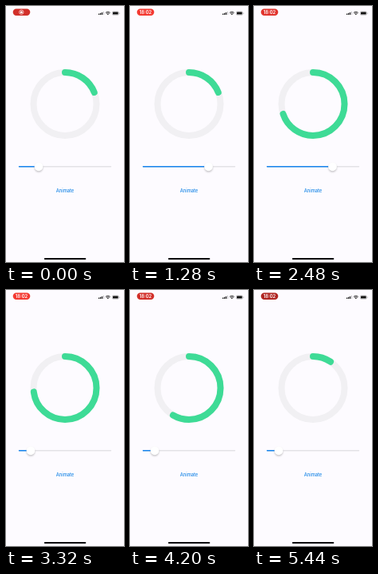
Animation, 148 px wide and 320 px high, one loop 5480 ms. Source, as an HTML page:

```html
<!DOCTYPE html>
<html lang="en">
<head>
<meta charset="utf-8">
<title>Progress ring</title>
<style>
  html, body { margin: 0; width: 100%; height: 100%; overflow: hidden; background: #fdfbff; }
  svg { display: block; width: 148px; height: 320px; }
  text { font-family: Inter, "Liberation Sans", sans-serif; text-anchor: middle; }
</style>
</head>
<body>
<svg viewBox="0 0 148 320">
  <defs>
    <filter id="soft" x="-60%" y="-60%" width="220%" height="220%">
      <feGaussianBlur stdDeviation="1.3"/>
    </filter>
  </defs>

  <!-- status bar -->
  <rect id="pill" x="8.7" y="3.5" width="21.6" height="8.4" rx="4.2"/>
  <g id="icon" fill="none" stroke="#fff" stroke-width=".7">
    <circle cx="19.3" cy="7.7" r="2.7"/>
    <circle cx="19.3" cy="7.7" r="1.5" fill="#fff" stroke="none"/>
  </g>
  <text id="clock" x="19.5" y="9.8" font-size="5.8" font-weight="600" fill="#fff">18:02</text>
  <g fill="#111">
    <rect x="116" y="9.5" width="1.2" height="1.6" rx=".3"/>
    <rect x="117.9" y="8.8" width="1.2" height="2.3" rx=".3"/>
    <rect x="119.8" y="7.9" width="1.2" height="3.2" rx=".3"/>
    <rect x="121.7" y="6.9" width="1.2" height="4.2" rx=".3" opacity=".3"/>
    <path d="M127.8 11.3L126.8 10.2Q127.8 9.4 128.8 10.2Z"/>
    <rect x="134" y="7.6" width="6.6" height="3" rx=".6"/>
    <rect x="142" y="8.4" width=".5" height="1.4" rx=".25" opacity=".5"/>
  </g>
  <g fill="none" stroke="#111">
    <path d="M124.9 8.3Q127.8 6 130.7 8.3M125.9 9.5Q127.8 8 129.7 9.5" stroke-width=".85"/>
    <rect x="133.3" y="6.9" width="8" height="4.4" rx="1.2" stroke-width=".4" opacity=".5"/>
  </g>

  <!-- ring -->
  <g fill="none" stroke-width="8" transform="rotate(-90 74 122.5)">
    <circle cx="74" cy="122.5" r="39.5" stroke="#f1f0f3"/>
    <circle id="arc" cx="74" cy="122.5" r="39.5" stroke="#3edb96" stroke-linecap="round" pathLength="1"/>
  </g>

  <!-- slider -->
  <rect x="15.8" y="200.1" width="116.4" height="1.4" rx=".7" fill="#e3e2e6"/>
  <rect id="fill" x="15.8" y="200.1" height="1.4" rx=".7" fill="#1785ee"/>
  <g id="knob">
    <circle cy="202.2" r="5.2" fill="#000" opacity=".24" filter="url(#soft)"/>
    <circle cy="200.8" r="5.4" fill="#fff"/>
  </g>

  <text id="button" x="74" y="233.2" font-size="5.7" font-weight="500" fill="#1785e6">Animate</text>
  <rect x="47.8" y="315" width="52.6" height="2" rx="1" fill="#0c0c0e"/>
</svg>
<script>
  const LOOP = 5480, STEP = 40;
  const $ = id => document.getElementById(id);
  const linear = u => u;

  // cubic-bezier(.42, 0, .58, 1)
  function easeInOut(u) {
    let lo = 0, hi = 1;
    for (let i = 0; i < 24; i++) {
      const s = (lo + hi) / 2;
      const x = 3 * (1 - s) ** 2 * s * .42 + 3 * (1 - s) * s * s * .58 + s ** 3;
      if (x < u) lo = s; else hi = s;
    }
    return lo * lo * (3 - 2 * lo);
  }

  // Each track is a list of [time, value].
  const tracks = {
    knob: [[0, 41], [320, 41], [1040, 98.5], [2840, 98.5], [3280, 31]],
    ring: [[0, .19], [1400, .19], [2700, .73], [3770, .73], [5070, .094]],
    button: [[0, 1], [1300, 1], [1340, .3], [1420, .3], [1680, 1],
             [3640, 1], [3680, .3], [3780, .3], [4040, 1]],
    clock: [[0, 0], [240, 0], [480, 1]],
    glow: [[0, .55], [1280, 1], [1960, .55], [2480, .75], [3320, 1], [4200, .55], [5440, .1]]
  };

  function at(track, t, ease = easeInOut) {
    const i = track.findIndex(k => k[0] > t);
    if (i < 0) return track[track.length - 1][1];
    const [t0, a] = track[i - 1], [t1, b] = track[i];
    return a + (b - a) * ease((t - t0) / (t1 - t0));
  }

  function draw(t) {
    const x = at(tracks.knob, t);
    $("knob").setAttribute("transform", `translate(${x} 0)`);
    $("fill").setAttribute("width", x - 15.8);
    $("arc").setAttribute("stroke-dasharray", `${at(tracks.ring, t)} 2`);
    $("button").setAttribute("opacity", at(tracks.button, t, linear));

    const clock = at(tracks.clock, t);
    $("clock").setAttribute("opacity", clock);
    $("icon").setAttribute("opacity", 1 - clock);

    const g = at(tracks.glow, t);
    $("pill").setAttribute("fill", `rgb(${168 + 76 * g}, ${36 + 22 * g}, ${32 + 18 * g})`);
  }

  const start = performance.now();
  function tick() {
    const t = (performance.now() - start) % LOOP;
    draw(Math.floor(t / STEP) * STEP);
    requestAnimationFrame(tick);
  }
  tick();
</script>
</body>
</html>
```
